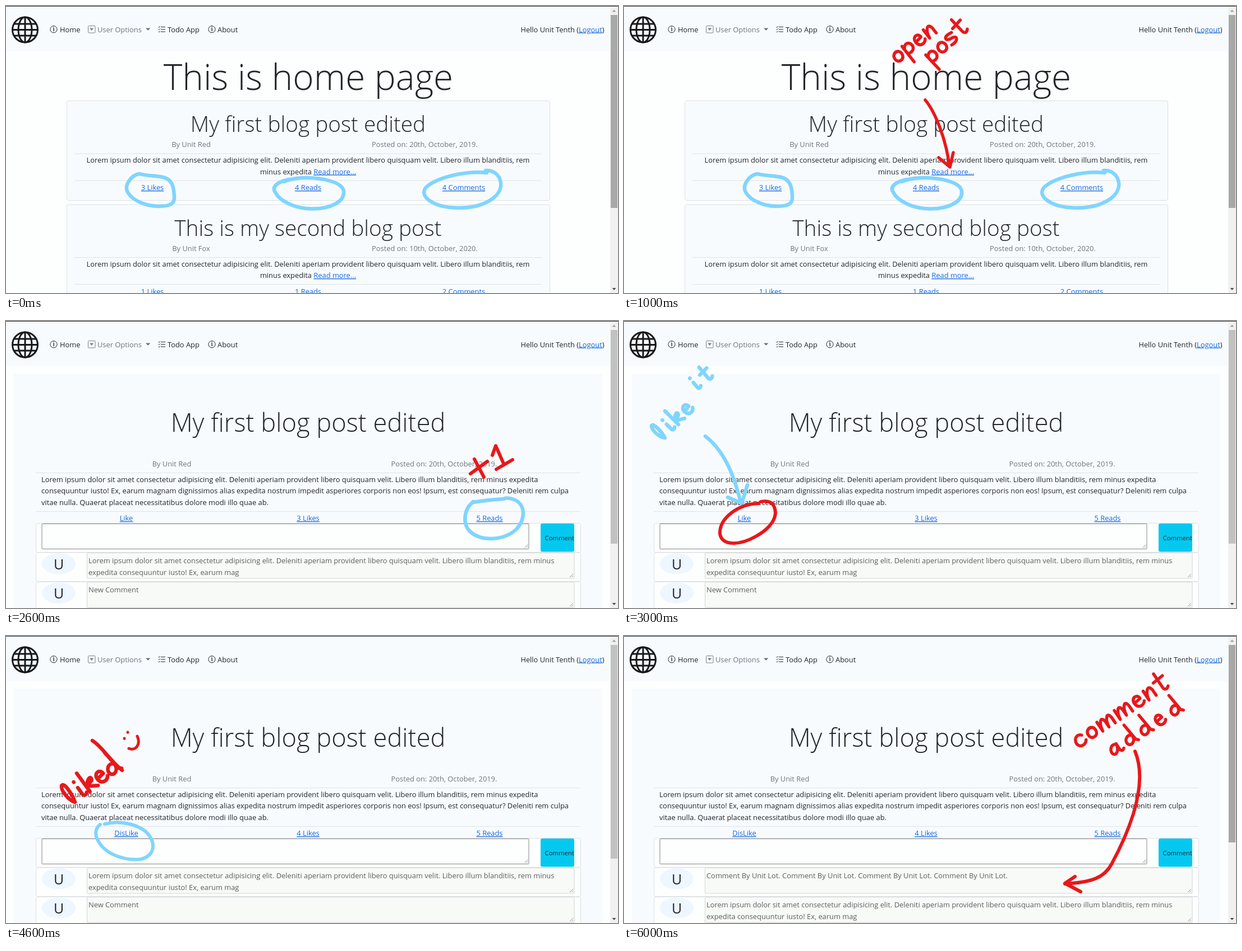
Write an HTML page that moves like this. It is 1091 px wide and 513 px high and loops after 7 s.

```html
<!DOCTYPE html>
<html lang="en">
<head>
<meta charset="utf-8">
<title>Blog walkthrough</title>
<style>
html, body { margin: 0; width: 100%; height: 100%; overflow: hidden; background: #fdfffe; }
svg { display: block; width: 1091px; height: 513px; }
text { font: 12.87px "Open Sans", "Noto Sans", sans-serif; fill: #212529; }
.mid { text-anchor: middle; }
.end { text-anchor: end; }
.link { fill: #1468e0; text-decoration: underline; }
.grey { fill: #6c757d; }
.dim { fill: #5c5e5e; }
.light { font-weight: 300; }
.line { fill: none; stroke: #212529; }
.rule { fill: none; stroke: #dfe2e6; }
.card { fill: #f8fbfe; stroke: #dcdfe3; }
.ink { fill: none; stroke-linecap: round; stroke-linejoin: round; }
.ink path { vector-effect: non-scaling-stroke; }
</style>
</head>
<body>
<svg id="stage" viewBox="0 0 1091 513"></svg>
<script>
const BLUE = '#80d5fe', RED = '#e8181b';
const LOREM = 'Lorem ipsum dolor sit amet consectetur adipisicing elit. Deleniti aperiam provident libero quisquam velit. Libero illum blanditiis, rem';
const NOTE = 'Comment By Unit Lot. '.repeat(4);

const text = (x, y, str, cls = '', size) =>
  `<text x="${x}" y="${y}" class="${cls}"${size ? ` style="font-size:${size}px"` : ''}>${str}</text>`;
const link = (x, y, str) => text(x, y, str, 'mid link');
const path = (d, attrs = 'class="line"') => `<path d="${d}" ${attrs}/>`;
const rect = (x, y, w, h, attrs) => `<rect x="${x}" y="${y}" width="${w}" height="${h}" ${attrs}/>`;
const rule = (x1, x2, y) => path(`M${x1} ${y}H${x2}`, 'class="rule"');
const ink = (color, width, ...parts) =>
  `<g class="ink" stroke="${color}" stroke-width="${width}">${parts.map(p => p[0] === '<' ? p : path(p, '')).join('')}</g>`;

// Handwritten letters: baseline at 0, x-height 10, centred on x = 0
const GLYPHS = {
  a: 'M4-8C-1-13-6-5-4-2C-1 2 4-4 4-9L4-2C5 1 7 0 8-1',
  c: 'M4-8C-1-13-6-6-4-2C-2 2 3 1 5-2',
  d: 'M4-7C0-12-6-6-4-2C-2 2 4-1 4-6M3-20L5-2L7 0',
  e: 'M-4-5L3-6C3-12-5-11-4-4C-3 2 3 1 5-2',
  i: 'M0-9L0-2C0 0 2 1 4-1M0-15v-.3',
  k: 'M-4-20L-4 0M-4-3C0-12 6-11 3-7L-3-5L5 0',
  l: 'M-1-19C3-21 2-6 0 0C-4-5-4-16-1-19',
  m: 'M-7-10L-7 0C-6-8-1-14 0-6L0 0C1-8 6-14 7-6L7 0',
  n: 'M-4-10L-4 0C-3-8 3-14 4-6L4 0',
  o: 'M2-9C-5-11-6 0 0 0C6 0 6-10 0-9.5',
  p: 'M-4-10L-4 9M-4-6C0-13 6-8 4-3C2 1-3 0-4-2',
  s: 'M4-9C-6-12-6-6 0-5C7-4 4 2-4 0',
  t: 'M0-18L0-3C0 1 3 1 5-1M-5-11L6-12'
};
const advance = ch => ({ m: 1.5, i: .8, l: .8 })[ch] || 1;

function scrawl(word, x, y, angle, gap, scale) {
  let pos = -advance(word[0]) / 2;
  const letters = [...word].map(ch => {
    const half = advance(ch) / 2;
    pos += half;
    const out = path(GLYPHS[ch], `transform="translate(${pos * gap} 0) scale(${scale})"`);
    pos += half;
    return out;
  });
  return `<g transform="translate(${x} ${y}) rotate(${angle})">${letters.join('')}</g>`;
}

const infoIcon = x => `<circle cx="${x}" cy="41.7" r="6.1" class="line"/>` +
  path(`M${x - 1} 40.2h1.2v5M${x} 37.2v1.4`, 'class="line" stroke-width="1.3"');

function chrome(thumbEnd, thumbColor) {
  return rect(0, 0, 1077, 80.5, 'fill="#f8fbfe"') +
    '<g class="line" style="stroke:#16181a;stroke-width:3">' +
    '<circle cx="34" cy="42.5" r="22.5"/><ellipse cx="34" cy="42.5" rx="12" ry="22.5"/>' +
    path('M34 20V65M11.5 42.5H56.5M14 32H54M14 53H54', '') + '</g>' +
    infoIcon(85) + text(96, 46.5, 'Home') +
    rect(146.5, 35.5, 12.5, 12.5, 'rx="1" fill="none" stroke="#7d8184"') +
    path('M149.2 39.5h7l-3.5 4.5z', 'fill="#7d8184"') +
    text(163, 46.5, 'User Options', 'grey') + path('M249 39.5h8.4l-4.2 4.3z', 'fill="#6c7074"') +
    path('M276 37.5h8M276 41.7h8M276 46h8M271.5 37.2l1.2 1.2 2-2.3M271.5 41.5l1.2 1.2 2-2.3M271.5 45.8l1.2 1.2 2-2.3') +
    text(288, 46.5, 'Todo App') + infoIcon(367) + text(377, 46.5, 'About') +
    text(1066.5, 46.5, 'Hello Unit Tenth (<tspan class="link">Logout</tspan>)', 'end') +
    rect(1077, 0, 14, 513, 'fill="#f1f1f1"') +
    rect(1078, 16, 12, thumbEnd - 16, `fill="${thumbColor}"`) +
    path('M1080.5 10.5h7l-3.5-4z', 'fill="#a3a3a3"') + path('M1080.5 504h7l-3.5 4z', 'fill="#505050"') +
    rect(0, 0, 1091, 1, 'fill="#303236"');
}

function postCard(y, title, author, date, counts) {
  return rect(108.5, y, 861, 178, 'rx="3.4" class="card"') +
    text(538.5, y + 55.5, title, 'mid light', 38.7) +
    text(330, y + 82.5, 'By ' + author, 'mid grey') +
    text(746.5, y + 82.5, 'Posted on: ' + date, 'mid grey') +
    rule(122, 955, y + 94.5) +
    text(538.5, y + 110.5, LOREM, 'mid') +
    text(538.5, y + 131, 'minus expedita <tspan class="link">Read more...</tspan>', 'mid') +
    rule(122, 955, y + 142.5) +
    [261, 538.5, 816].map((x, i) => link(x, y + 159.5, counts[i])).join('');
}

const home = () => chrome(361, '#a8a8a8') +
  text(539, 150, 'This is home page', 'mid light', 63.9) +
  postCard(169.5, 'My first blog post edited', 'Unit Red', '20th, October, 2019.', ['3 Likes', '4 Reads', '4 Comments']) +
  postCard(355, 'This is my second blog post', 'Unit Fox', '10th, October, 2020.', ['1 Likes', '1 Reads', '2 Comments']) +
  ink(BLUE, 6.5,
    'M237 300C222 303 210 322 217 333C226 349 252 358 272 358C294 358 301 353 300 340C299 322 296 310 280 306C266 303 252 304 238 300',
    'M505 310C484 314 473 323 480 333C488 349 515 362 545 362.5C580 363 604 349 602 331C600 315 565 307 535 307C520 307 507 309 495 314',
    'M857 298C820 294 770 306 750 323C734 339 760 359 800 360.5C850 363 885 341 882 316C880 301 868 293 855 294');

const grip = (x, y) => path(`M${x - 6} ${y}l6-6M${x - 2.5} ${y}l2.5-2.5`, 'fill="none" stroke="#858585" stroke-width=".9"');

const comment = (y, lines) => rect(53.5, y, 971, 51.5, 'rx="3.4" fill="#fdfffe" stroke="#dcdfe3"') +
  `<ellipse cx="94" cy="${y + 20}" rx="30" ry="18.7" fill="#eef6ff"/>` + text(94, y + 29.5, 'U', 'mid', 25) +
  rect(144.5, y + .5, 868.5, 45.5, 'rx="1" fill="#f8faf8" stroke="#d4d6d5"') +
  lines.map((s, i) => text(147, y + 19 + i * 20.5, s, 'dim')).join('') + grip(1011, y + 44);

const QUOTE = [LOREM + ' minus', 'expedita consequuntur iusto! Ex, earum mag'];

function post({ like, likes, comments, typing, thumb = [398, '#c1c1c1'] }) {
  return chrome(...thumb) + rect(14, 94.5, 1049, 419, 'fill="#f8fbfe"') +
    text(538.5, 197.7, 'My first blog post edited', 'mid light', 45.2) +
    text(295.5, 259.5, 'By Unit Red', 'mid grey') +
    text(781, 259.5, 'Posted on: 20th, October, 2019.', 'mid grey') +
    rule(53, 1024, 271.5) +
    text(63, 287.5, LOREM + ' minus expedita') +
    text(63, 308, 'consequuntur iusto! Ex, earum magnam dignissimos alias expedita nostrum impedit asperiores corporis non eos! Ipsum, est consequatur? Deleniti rem culpa') +
    text(63, 328.5, 'vitae nulla. Quaerat placeat necessitatibus dolore modi illo quae ab.') +
    rule(53, 1024, 340.5) +
    link(214.5, 357, like) + link(538.5, 357, likes) + link(862, 357, '5 Reads') +
    rect(53.5, 361.5, 971, 52, 'rx="3.4" fill="#fdfffe" stroke="#dcdfe3"') +
    (typing
      ? rect(64, 362.5, 868, 45, 'rx="1.5" fill="#fdfffe" stroke="#15171a" stroke-width="2"') +
        text(66, 380.5, NOTE) + path('M608.5 367V384') +
        path('M909 391q5-5 10 0M911 394q3-3 6 0M912 396l4 3.5M916 396l-4 3.5', 'fill="none" stroke="#c4c7c9"')
      : rect(64, 362.5, 868, 45, 'rx="1" fill="#fdfffe" stroke="#858787"')) +
    grip(930.5, 405.5) +
    rect(953, 362, 60, 50.5, `rx="3" fill="${typing ? '#1bd0f5' : '#05c8f0'}"`) +
    text(960.5, 392, 'Comment', '', 11.3) +
    comment(414, comments[0]) + comment(466.2, comments[1]);
}

const before = { like: 'Like', likes: '3 Likes', comments: [QUOTE, ['New Comment']] };
const after = { ...before, like: 'DisLike', likes: '4 Likes' };

const scenes = [
  home(),
  home() + ink(RED, 5.5,
    scrawl('open', 494, 97, -38, 24, 1.85), scrawl('post', 556, 96, -43, 23, 1.85),
    'M537 168C553 187 574 235 580 286', 'M561 271L581 288L587 262'),
  post(before) +
    ink(BLUE, 6.5, 'M833 323C816 336 813 363 828 377C850 396 890 391 910 372C928 352 925 326 905 319C897 316 890 316 887 318C868 319 850 321 832 324') +
    ink(RED, 6, 'M835 247L852 279M828 273L858 251', 'M867 240L873 223L888 257M874 265L903 248'),
  post(before) +
    ink(BLUE, 6.5, scrawl('like', 73, 209, -45, 24, 1.7), scrawl('it', 133, 121, -40, 28, 1.6),
      'M145 206C176 230 195 270 208 324', 'M185 315L210 326L220 293') +
    ink(RED, 6, 'M240 326C204 327 170 352 171 380C174 403 207 401 235 385C262 370 275 350 268 333C264 322 254 321 244 323'),
  post(after) +
    ink(BLUE, 6, 'M168 337C158 344 158 358 166 369C180 392 215 402 240 399C262 394 267 376 257 359C245 339 208 328 176 336') +
    ink(RED, 6.5, scrawl('liked', 123, 297, -36, 24, 2), 'M154 187C172 198 184 222 207 240') +
    ink(RED, 5, 'M211 183v.2M217 172v.2', 'M234 179C241 195 230 206 219 201'),
  post({ ...after, typing: true }) +
    ink(BLUE, 6.5,
      'M92 341C68 348 51 370 56 390C62 410 100 420 140 419C200 418 300 425 380 419C460 411 560 413 600 402C640 390 641 362 610 352C580 342 540 332 480 335C420 341 350 354 310 353C230 350 150 336 68 343',
      'M573 267C576 300 584 318 594 328', 'M573 292C563 264 588 250 592 270C594 286 586 293 581 294',
      scrawl('nt', 614, 284, -45, 22, 1.6), scrawl('comment', 659, 255, -45.5, 21.5, 1.6)),
  post({ ...after, comments: [[NOTE], QUOTE], thumb: [369, '#a8a8a8'] }) +
    ink(RED, 5.5, scrawl('comment', 818, 194, -34, 25, 1.9), scrawl('added', 880, 210, -33.5, 32, 1.8)) +
    ink(RED, 6, 'M911 206C923 235 922 272 908 318C896 356 882 384 869 408C856 432 835 440 786 443', 'M804 430L786 442L814 457')
];

const stage = document.getElementById('stage');
stage.innerHTML = scenes.map(s => `<g display="none">${s}</g>`).join('');
let shown = -1;

function tick() {
  const index = Math.floor(performance.now() / 1000) % scenes.length;
  if (index !== shown) {
    [...stage.children].forEach((g, i) => g.setAttribute('display', i === index ? 'inline' : 'none'));
    shown = index;
  }
  requestAnimationFrame(tick);
}
tick();
</script>
</body>
</html>
```
